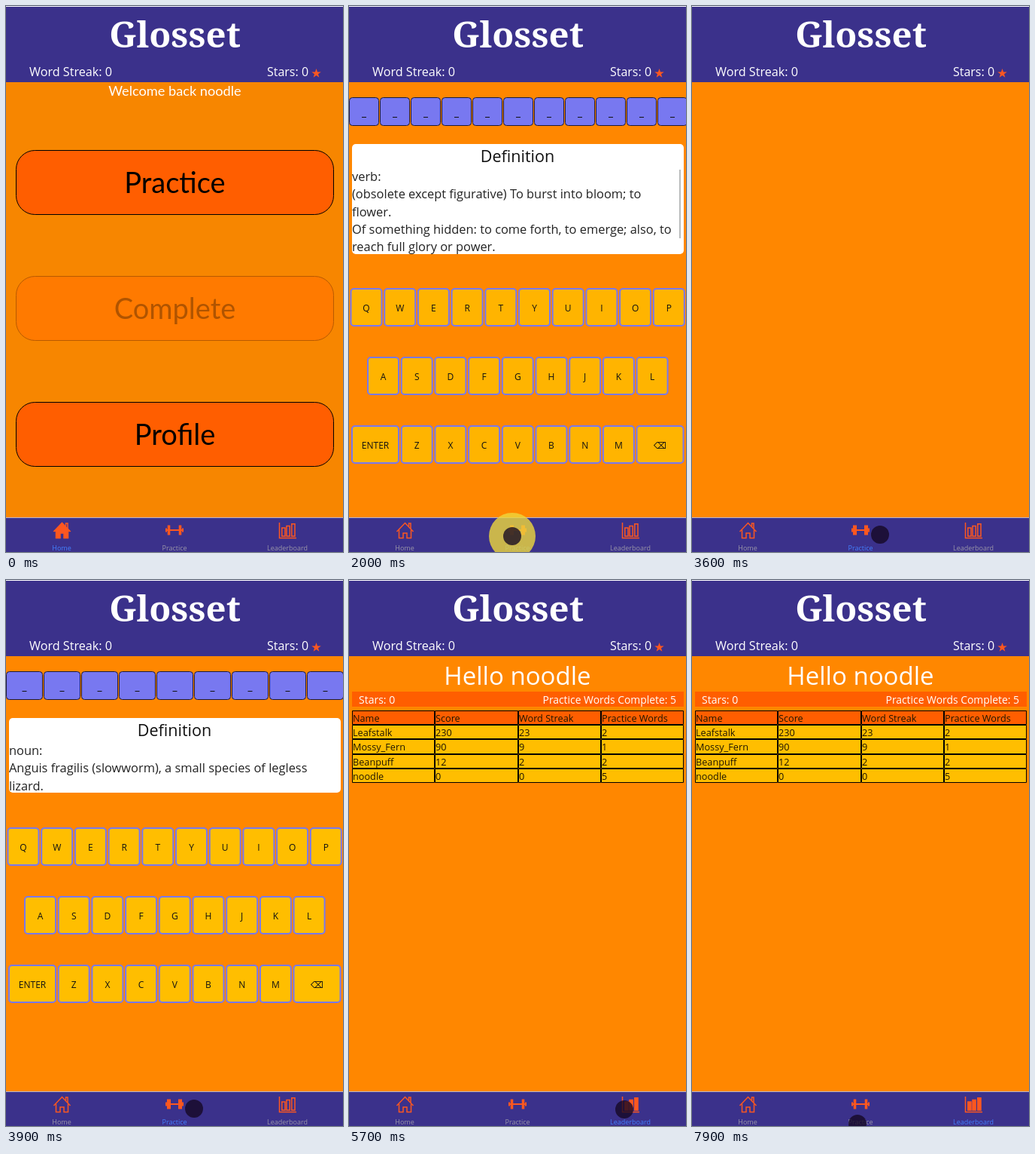
An HTML page with a canvas for the animation above (8 s loop, 448 by 724 pixels).

```html
<!DOCTYPE html>
<html lang="en">
<head>
<meta charset="utf-8">
<title>Word game</title>
<style>
html, body { margin: 0; width: 100%; height: 100%; overflow: hidden; background: #ff8700; }
canvas { display: block; }
</style>
</head>
<body>
<canvas id="stage" width="448" height="724"></canvas>
<script>
const ctx = document.getElementById('stage').getContext('2d');
const LOOP = 8000, STEP = 100;
const PURPLE = '#3b318b', ORANGE = '#ff8700', RED = '#ff5e00', AMBER = '#ffbe00', LILAC = '#7878f0', ICON = '#fc5720';
const SANS = '"Open Sans", "Noto Sans", sans-serif', ROUND = 'Lato, sans-serif';

// time, x, y
const cursorPath = [
  [600, 92, 738], [1200, 144, 700], [1600, 217, 703], [2600, 217, 703], [2700, 219, 704],
  [2900, 222, 704], [3100, 222, 704], [3600, 250, 701], [4000, 250, 701], [5000, 366, 702],
  [7100, 366, 702], [7900, 220, 721], [8000, 210, 727]
];

const longWord = {
  letters: 11, pitch: 41, cardHeight: 146, keyTop: 375, keyFill: '#ffb400', scroll: true,
  lines: ['verb:', '(obsolete except figurative) To burst into bloom; to', 'flower.',
    'Of something hidden: to come forth, to emerge; also, to', 'reach full glory or power.']
};
const shortWord = {
  letters: 9, pitch: 50, cardHeight: 99, keyTop: 329, keyFill: AMBER,
  lines: ['noun:', 'Anguis fragilis (slowworm), a small species of legless', 'lizard.']
};
const scores = [
  ['Name', 'Score', 'Word Streak', 'Practice Words'],
  ['Leafstalk', 230, 23, 2], ['Mossy_Fern', 90, 9, 1], ['Beanpuff', 12, 2, 2], ['noodle', 0, 0, 5]
];

function text(str, x, y, size, color = '#fff', align = 'left', family = SANS, weight = 400) {
  ctx.font = `${weight} ${size}px ${family}`;
  ctx.fillStyle = color;
  ctx.textAlign = align;
  ctx.fillText(str, x, y);
}

function rect(x, y, w, h, color) {
  ctx.fillStyle = color;
  ctx.fillRect(x, y, w, h);
}

function box(x, y, w, h, r, fill, stroke, line = 1) {
  ctx.beginPath();
  ctx.roundRect(x, y, w, h, r);
  ctx.fillStyle = fill;
  ctx.fill();
  if (!stroke) return;
  ctx.strokeStyle = stroke;
  ctx.lineWidth = line;
  ctx.stroke();
}

function disc(x, y, r, color) {
  ctx.fillStyle = color;
  ctx.beginPath();
  ctx.arc(x, y, r, 0, 2 * Math.PI);
  ctx.fill();
}

function header() {
  rect(0, 0, 448, 101, PURPLE);
  rect(0, 0, 448, 1, '#fff');
  text('Glosset', 224.5, 55, 47.4, '#fff', 'center', '"Noto Serif", serif', 700);
  text('Word Streak: 0', 31, 93, 16.2);
  text('Stars: 0', 347, 93, 16);
  ctx.fillStyle = ICON;
  ctx.beginPath();
  for (let i = 0; i < 10; i++) {
    const r = i % 2 ? 2.6 : 6.6, a = Math.PI * (i / 5 - 0.5);
    ctx.lineTo(412.5 + r * Math.cos(a), 89.5 + r * Math.sin(a));
  }
  ctx.fill();
}

function homeIcon(active) {
  const roof = new Path2D('M63.5 697 L74.5 685.5 L85.5 697');
  const walls = new Path2D('M66.5 694.5 V705.5 H72 V699 H77 V705.5 H82.5 V694.5');
  if (active) {
    ctx.fill(new Path2D('M62.5 697 L74.5 684.5 L86.5 697 H83 V706 H77 V699 H72 V706 H66 V697 Z'));
  }
  ctx.stroke(roof);
  ctx.stroke(walls);
  ctx.stroke(new Path2D('M79.5 690 V686 H82 V693'));
}

function practiceIcon(active) {
  const plate = active ? 5 : 3.5;
  rect(214, 694, 20, 2, ICON);
  for (const side of [-1, 1]) {
    ctx.fillRect(224 + side * 11 - 1, 692.5, 2, 5);
    ctx.fillRect(224 + side * 7.5 - plate / 2, 688.5, plate, 13);
  }
}

function chartIcon(active) {
  ctx.stroke(new Path2D('M363.5 685 V705.5 H386'));
  [[366.8, 692], [373, 689.5], [379.8, 686.8]].forEach(([x, y]) => {
    ctx.strokeRect(x, y, 4.2, 703 - y);
    if (active) ctx.fillRect(x, y, 4.2, 703 - y);
  });
}

function nav(active) {
  rect(0, 678, 448, 46, PURPLE);
  rect(0, 678, 448, 1, '#b9b3cb');
  ['Home', 'Practice', 'Leaderboard'].forEach((label, i) => {
    ctx.strokeStyle = ctx.fillStyle = ICON;
    ctx.lineWidth = 1.5;
    [homeIcon, practiceIcon, chartIcon][i](i === active);
    text(label, 74 + 150 * i, 722, 9, i === active ? '#4380ff' : '#9a96a8', 'center');
  });
}

function homePage() {
  rect(0, 101, 448, 577, '#f78600');
  text('Welcome back noodle', 224.5, 119, 18.2, '#fff', 'center', ROUND);
  ['Practice', 'Complete', 'Profile'].forEach((label, i) => {
    const y = 191 + 167 * i, off = i === 1;
    box(13.5, y + 0.5, 422, 85, 25, off ? '#ff7a00' : RED, off ? '#b85a00' : '#000');
    text(label, 224.5, y + 57, 38, off ? '#b05400' : '#000', 'center', ROUND);
  });
}

function key(label, x, y, w, fill) {
  box(x + 1, y, w - 2, 49, 4, fill, LILAC, 2);
  text(label, x + w / 2, y + 29.5, 12, '#111', 'center', SANS + ', "DejaVu Sans"');
}

function practicePage(word) {
  for (let i = 0; i < word.letters; i++) {
    const x = i * word.pitch;
    box(x + 0.5, 121.5, word.pitch - 2, 37, 4, LILAC, '#1c1a38');
    rect(x + word.pitch / 2 - 3.5, 147, 6, 1, '#111');
  }
  box(4, 183, 441, word.cardHeight, 5, '#fff');
  text('Definition', 224, 207, 21.5, '#111', 'center');
  word.lines.forEach((line, i) => text(line, 4, 232 + 23.3 * i, 16.4, '#222'));
  if (word.scroll) rect(439, 217, 2, 91, '#b9bcbc');

  const y = word.keyTop, fill = word.keyFill, pitch = 44.7;
  [...'QWERTYUIOP'].forEach((c, i) => key(c, 1.5 + pitch * i, y, 43, fill));
  [...'ASDFGHJKL'].forEach((c, i) => key(c, 24 + pitch * i, y + 91, 43, fill));
  key('ENTER', 3, y + 182, 64, fill);
  [...'ZXCVBNM'].forEach((c, i) => key(c, 68.7 + pitch * i, y + 182, 43, fill));
  key('⌫', 381.5, y + 182, 64, fill);
}

function leaderPage() {
  text('Hello noodle', 224, 139, 33, '#fff', 'center');
  rect(4, 148, 441, 20, RED);
  text('Stars: 0', 13, 164, 14);
  text('Practice Words Complete: 5', 435, 164, 13.9, '#fff', 'right');
  const left = c => Math.round(4 + 110.25 * c), top = r => Math.round(173 + 19.2 * r);
  scores.forEach((row, r) => row.forEach((cell, c) => {
    const x = left(c), y = top(r);
    box(x + 0.5, y + 0.5, left(c + 1) - x - 1, top(r + 1) - y - 1, 0, r ? AMBER : RED, '#000');
    text(cell, x + 1, y + 15, 12.7, '#1e1600');
  }));
}

function cursorAt(t) {
  const i = cursorPath.findIndex(p => p[0] > t);
  if (i < 1) return null;
  const [t0, x0, y0] = cursorPath[i - 1], [t1, x1, y1] = cursorPath[i];
  const k = (t - t0) / (t1 - t0);
  return [x0 + (x1 - x0) * k, y0 + (y1 - y0) * k];
}

function draw(t) {
  rect(0, 0, 448, 724, ORANGE);
  if (t < 2000) homePage();
  else if (t < 2200) practicePage(longWord);
  else if (t >= 3900 && t < 5500) practicePage(shortWord);
  else if (t >= 5500) leaderPage();
  header();
  nav(t < 2000 ? 0 : t < 5500 ? 1 : 2);

  const cursor = cursorAt(t);
  if (!cursor) return;
  const pressed = (t >= 1900 && t < 2300) || (t >= 5300 && t < 5700);
  if (pressed) disc(...cursor, 31, 'rgba(238, 216, 60, 0.8)');
  disc(...cursor, 12, 'rgba(20, 8, 35, 0.78)');
}

function tick() {
  const t = performance.now() % LOOP;
  draw(Math.floor(t / STEP) * STEP);
  requestAnimationFrame(tick);
}
tick();
</script>
</body>
</html>
```
